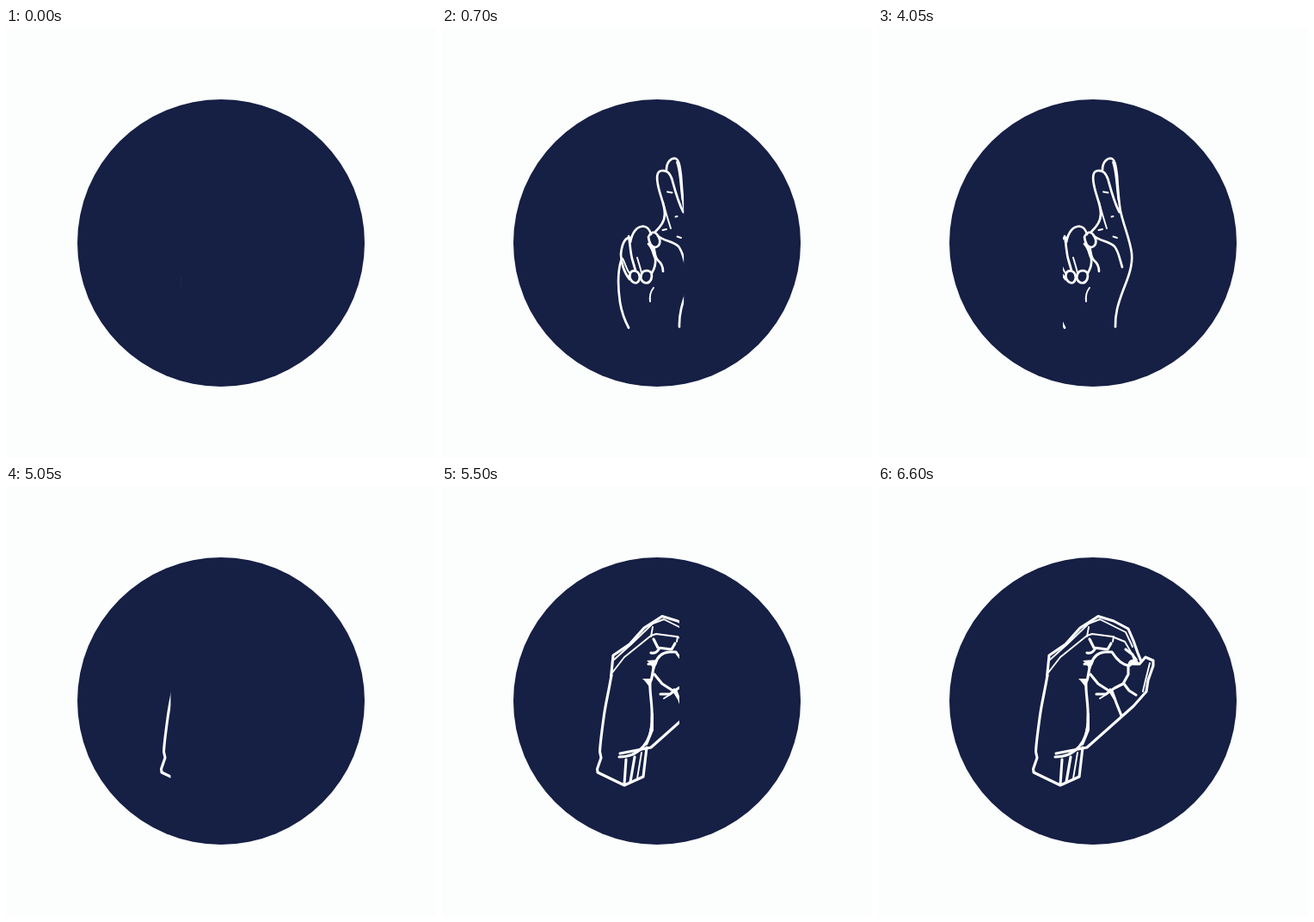
An HTML page without scripts for the animation above (8 s loop, 500 by 500 pixels).

```html
<!DOCTYPE html>
<html lang="en">
<head>
<meta charset="utf-8">
<title>Hand signs</title>
<style>
  html, body { margin: 0; width: 100%; height: 100%; overflow: hidden; background: #fcfefd; }
  svg { display: block; width: 100%; height: 100%; }
  .ink { fill: none; stroke: #fcfefd; stroke-width: 2.7; stroke-linecap: round; stroke-linejoin: round; }
  .thin { stroke-width: 1.9; }
  .bold { stroke-width: 3.1; }
  .solid { fill: #fcfefd; stroke: none; }
</style>
</head>
<body>
<svg viewBox="0 0 500 500">
  <defs>
    <!-- left-to-right wipes, cubic ease-out over 1.6 s -->
    <clipPath id="wipeA">
      <rect x="203" y="140" width="0" height="220">
        <animate attributeName="width" dur="8s" repeatCount="indefinite" calcMode="spline"
          values="0;95;95" keyTimes="0;.2;1" keySplines=".33333 1 .66667 1;0 0 1 1"/>
        <animate attributeName="x" dur="8s" repeatCount="indefinite" calcMode="discrete"
          values="203;215" keyTimes="0;.50625"/>
      </rect>
    </clipPath>
    <clipPath id="wipeB">
      <rect x="178" y="140" width="0" height="220">
        <animate attributeName="width" dur="8s" repeatCount="indefinite" calcMode="spline"
          values="0;0;145;145" keyTimes="0;.625;.825;1" keySplines="0 0 1 1;.33333 1 .66667 1;0 0 1 1"/>
      </rect>
    </clipPath>
  </defs>

  <circle cx="250" cy="250" r="167" fill="#161f44"/>

  <!-- crossed fingers -->
  <g clip-path="url(#wipeA)">
    <g class="ink">
      <animate attributeName="visibility" dur="8s" repeatCount="indefinite" calcMode="discrete"
        values="visible;hidden" keyTimes="0;.5125"/>
      <!-- raised fingers and outer edge -->
      <path d="M261 165C261 156 266 151.500 270.500 151.500C275.500 152 276.500 160 278 172C279 188 280 202 282 213C286 231 293 246 295 262C296.500 276 291 290 285 305C279 321 275.500 333 276 347.500"/>
      <path d="M248 237C254 231 259 225 259 216C259 205 253 194 251 182C249.500 174 249.500 167 255 166C262 165 265 169 267.500 176C271 189 274 201 280.500 214"/>
      <path class="thin" d="M273 156C277 166 277 182 279.500 200"/>
      <path class="thin" d="M257 202C260 214 263 224 266 233"/>
      <path class="thin" d="M262 190.500L267.500 191.500M271.500 219.500L273.500 219M256.500 235L261 234M273.500 242.500L278 244"/>
      <!-- thumb -->
      <path d="M240 243C244 235 249 237 252 243C255 249 253 254 248 255C243 255 241 250 240 243Z"/>
      <path d="M251 242C259 248 269 248 275 254C280 260 281 269 284 278"/>
      <path d="M246 255C248 260 247 266 251 270C256 274 257 278 257 283"/>
      <!-- folded fingers -->
      <path d="M219 244C212 243 209 253 208 263C208 273 212 285 218 292"/>
      <path d="M217 242C219 252 219 262 221.500 270L225 282"/>
      <path d="M219 249C221 239 226 231 234 230.500C240 231 242 236 243 240"/>
      <path d="M240 251C246 257 245 263 248 268C249 275 247 280 244 285"/>
      <path class="thin" d="M210 268C213 273 214 280 218 285M227 267C229 274 231 280 232 285"/>
      <path d="M219 285C221 281 227 282 229 286C231 291 229 296 225 296.500C220 296 217 290 219 285Z"/>
      <path d="M232 286C234 281 241 281 243.500 285C245 291 242 296.500 237.500 296.500C232 296 230 291 232 286Z"/>
      <!-- palm and wrist -->
      <path class="thin" d="M246 302C242 307 241 311 242 318"/>
      <path d="M208 271C204 285 204.500 302 207 319C209 331 213 341 217 348.500"/>
    </g>
  </g>

  <!-- rounded hand -->
  <g clip-path="url(#wipeB)">
    <g class="ink bold">
      <!-- back of the hand and wrist -->
      <path d="M197 220C194 238 190.500 252 188.500 266C186 284 184 298 183.500 309L185 316L180.500 329L181 333L212 348L234 338L238 304"/>
      <path d="M196.500 222L199 197L218 184L235 165L256 151.500L274 157L291 166L297 180L302 194L306 204"/>
      <path class="thin" d="M198 217L212 199L243 174L249 172L272 175L287 181L294 193L301 202"/>
      <path class="thin" d="M200 202L220 184L245 160L258 155L276 164L288 170L296 187"/>
      <path class="thin" d="M245 164L243 175M274 175L273 181"/>
      <!-- knuckle and inner curve -->
      <path d="M246 178L251 188L267 190L271 183"/>
      <path d="M243 194C247 195 250 193 252 190M240 207L248 207C250 199 255 194 264 193L272 193C277 201 284 208 292 209L298 205"/>
      <path d="M248 205C243 217 246 222 242 228C241 240 245 254 244 270C245 284 240 296 234 303C227 311 217 315 206 315"/>
      <path class="solid" d="M233 224L244 224L242 236C240 231 237 228 233 224ZM238 203L251 202L246 216C245 210 242 206 238 203ZM243 264L246 264L246 284L239 301L234 303C241 292 243 279 243 264Z"/>
      <!-- thumb and fingertips -->
      <path d="M297 207L304 207L311 199L320 203L320 209L314 226L312 239L297 256L243 304L207 311"/>
      <path class="thin" d="M316 206L311 226L308 239"/>
      <path d="M247 219L256 230L270 239L275 247"/>
      <path d="M254 242L265 242L275 235L285 230L291 219L291 210"/>
      <path d="M286 230L292 238L300 243M272 238L277 252L283 267"/>
      <path class="thin" d="M258 247L266 242L270 236"/>
      <path d="M292 207C294 202 299 202 302 206M288 190L296 196L300 206"/>
      <!-- cuff lines -->
      <path d="M214 318L212 347M224 315L219 344"/>
      <path class="thin" d="M232 310L227 340"/>
    </g>
  </g>
</svg>
</body>
</html>
```
